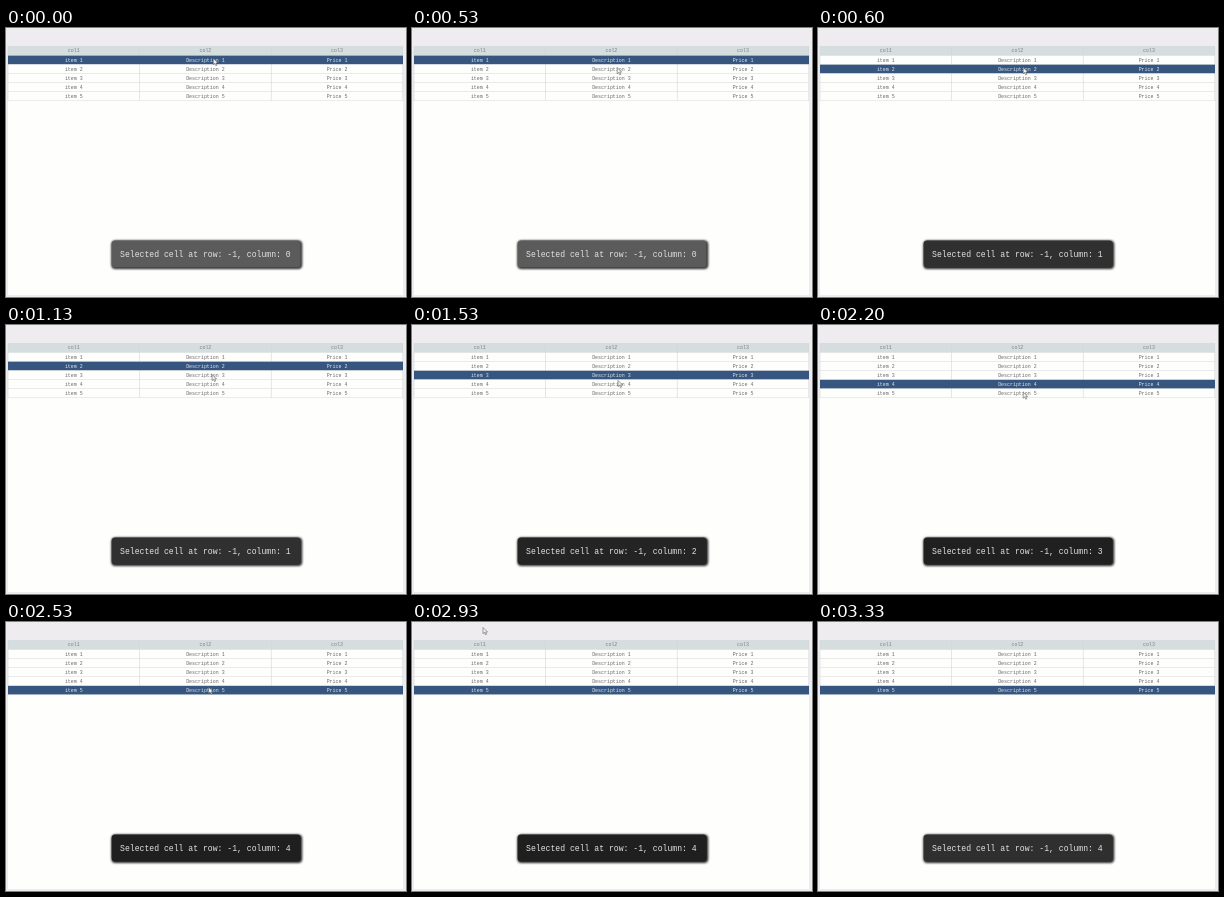
Recreate the animation shown at these times as an HTML page. Size 400x269 px, loop 3.54 s.

```html
<!DOCTYPE html>
<html lang="en">
<head>
<meta charset="utf-8">
<title>Table selection</title>
<style>
  html, body { margin: 0; width: 100%; height: 100%; overflow: hidden; background: #eeecef; }
  svg { display: block; width: 100%; height: 100%; }
  text { font-family: "Liberation Mono", "Courier New", monospace; }
  .cell { font-size: 4.95px; text-anchor: middle; }
  #message { font-size: 8.15px; fill: #e4e4e4; white-space: pre; }
</style>
</head>
<body>
<svg viewBox="0 0 400 269" preserveAspectRatio="none">
  <defs>
    <filter id="shadow" x="-10%" y="-40%" width="120%" height="180%">
      <feGaussianBlur stdDeviation="1.1"/>
    </filter>
  </defs>
  <rect width="400" height="269" fill="#eeecef"/>
  <rect x="2" y="18" width="395" height="249" fill="#fefefd"/>
  <g id="table"></g>
  <rect x="105.4" y="212.4" width="190.8" height="28.6" rx="4" opacity=".85" filter="url(#shadow)"/>
  <rect id="panel" x="105.6" y="212.6" width="189" height="27" rx="3.5"/>
  <text id="message" x="114" y="228.5"></text>
  <path id="cursor" d="M0 0V6.2L1.5 4.9L2.5 7.2L3.6 6.7L2.6 4.5H4.5Z" fill="#f4f4f4" stroke="#555" stroke-width=".55" stroke-linejoin="round"/>
</svg>
<script>
const LOOP = 3540, TICK = 1000 / 15;
const LEFT = 2, WIDTH = 395, HEAD = 18, TOP = 27.5, ROW = 9.07, COLUMN = 131.6;
const INK = "#686868";
const byId = id => document.getElementById(id);
const table = byId("table"), panel = byId("panel"), message = byId("message"), cursor = byId("cursor");

function add(tag, attrs, label) {
  const el = document.createElementNS("http://www.w3.org/2000/svg", tag);
  for (const key in attrs) el.setAttribute(key, attrs[key]);
  if (label) el.textContent = label;
  return table.appendChild(el);
}

const addBox = (x, y, width, height, fill) => add("rect", { x, y, width, height, fill });

const addRow = (labels, y, fill) => labels.map((label, i) =>
  add("text", { class: "cell", x: LEFT + COLUMN * (i + 0.5), y, fill }, label));

addBox(LEFT, HEAD, WIDTH, TOP - HEAD, "#d6dddf");
for (let i = 0; i <= 5; i++) addBox(LEFT, TOP + i * ROW - 0.4, WIDTH, 0.6, "#dcdfdf");
for (let i = 0; i <= 3; i++) addBox(LEFT + i * COLUMN - 0.3, HEAD, 0.6, TOP + 5 * ROW - HEAD, "#d2d7d9");
const highlight = addBox(LEFT, TOP, WIDTH, ROW - 0.55, "#36567f");

addRow(["col1", "col2", "col3"], 24.4, "#788083");
const rows = [1, 2, 3, 4, 5].map((n, i) =>
  addRow([`item ${n}`, `Description ${n}`, `Price ${n}`], TOP + i * ROW + 6.1, INK));

const clicks = [600, 1200, 1730, 2270];

// Cursor moves; the last one leaves the table.
const home = { x: 207.3, y: 30.5 };
const moves = [
  { from: 0, to: 533, x: 205.2, y: 39.6 },
  { from: 933, to: 1133, x: 206, y: 49.4 },
  { from: 1467, to: 1533, x: 206, y: 55.4 },
  { from: 1867, to: 2200, x: 205.2, y: 67 },
  { from: 2467, to: 2533, x: 202.6, y: 65.2 },
  { from: 2733, to: 2933, x: 71, y: 5.5 }
];

function cursorAt(t) {
  let { x, y } = home;
  for (const m of moves) {
    const k = Math.min(1, Math.max(0, (t - m.from) / (m.to - m.from)));
    x += (m.x - x) * k;
    y += (m.y - y) * k;
  }
  return [x, y];
}

function render(t) {
  const selected = clicks.filter(click => click <= t).length;
  highlight.setAttribute("y", TOP + selected * ROW + 0.1);
  rows.forEach((cells, i) => cells.forEach(cell =>
    cell.setAttribute("fill", i === selected ? "#dfe6ee" : INK)));

  // The panel darkens with each message and fades at the end.
  const shade = Math.round(31 + 60 * 0.28 ** selected + (t >= 3330 ? 16 : 0));
  panel.setAttribute("fill", `rgb(${shade},${shade},${shade})`);
  message.textContent = `Selected cell at row: -1, column: ${selected}`;

  const [x, y] = cursorAt(Math.floor((t + 4) / TICK) * TICK + 0.5);
  cursor.setAttribute("transform", `translate(${x} ${y})`);
  cursor.setAttribute("visibility", t < 3000 ? "visible" : "hidden");
}

const start = performance.now();
function loop() {
  render((performance.now() - start) % LOOP);
  requestAnimationFrame(loop);
}
loop();
</script>
</body>
</html>
```
